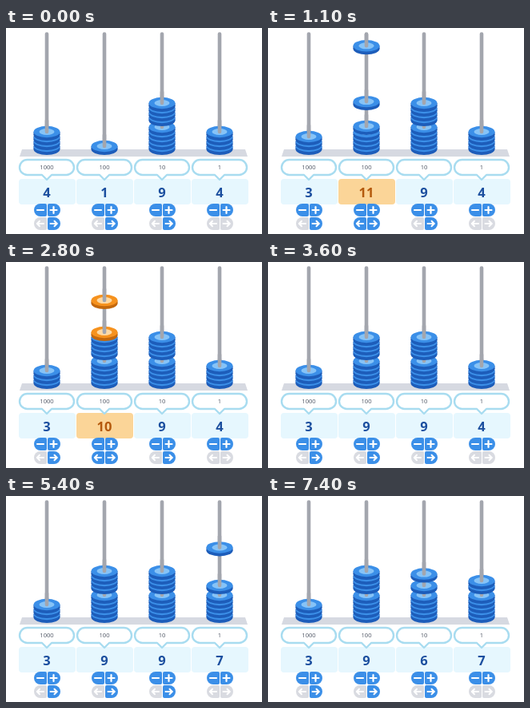
Recreate the animation shown at these times as an HTML page with a canvas. Size 320 by 258 pixels, loop 7.5 s.

```html
<!DOCTYPE html>
<html lang="en">
<head>
<meta charset="utf-8">
<title>Place value abacus</title>
<style>
  html, body { margin: 0; width: 100%; height: 100%; overflow: hidden; background: #fff; }
  canvas { display: block; width: 100vw; height: 100vh; }
</style>
</head>
<body>
<canvas id="stage"></canvas>
<script>
const W = 320, H = 258, LOOP = 7500;
const DROP = 300, LIFT = 200, LEAD = 18, OFF_Y = -21;
const BLUE = { top: '#3b8fe8', side: '#1d5dba', hole: '#86c3f7' };
const ORANGE = { top: '#f6921e', side: '#c4680c', hole: '#fdd9a4' };
const ROD = '#a3a6ae', OFF = '#d9dbe1', FONT = '"Open Sans", "Noto Sans", sans-serif';

const canvas = document.getElementById('stage');
const ctx = canvas.getContext('2d');

// adds: [click time, delay before the disc drops]; lifts: click times
const exchange = 653;
const columns = [
  { x: 51, unit: 1000, start: 4, adds: [], lifts: [exchange - LEAD] },
  { x: 123, unit: 100, start: 1,
    adds: Array.from({ length: 10 }, (_, i) => [exchange, Math.max(0, i - 1) * 100]),
    lifts: [2758, 3158] },
  { x: 195, unit: 10, start: 9, adds: [], lifts: [6840, 7140, 7385] },
  { x: 267, unit: 1, start: 4, adds: [[4498, 0], [4898, 0], [5301, 0]], lifts: [] }
];

// cubic-bezier(.25, .1, .25, 1)
function ease(x) {
  if (x <= 0) return 0;
  if (x >= 1) return 1;
  const curve = (s, a, b) => 3 * a * s * (1 - s) ** 2 + 3 * b * s * s * (1 - s) + s ** 3;
  let lo = 0, hi = 1;
  for (let i = 0; i < 20; i++) {
    const mid = (lo + hi) / 2;
    if (curve(mid, .25, .25) < x) lo = mid; else hi = mid;
  }
  return curve(lo, .1, 1);
}

const restY = k => 154 - 6 * k - (k > 5 ? 6 : 0);

function discY(col, k, t) {
  const rest = restY(k), total = col.start + col.adds.length;
  const add = col.adds[k - col.start - 1], lift = col.lifts[total - k];
  let y = rest;
  if (add) y = OFF_Y + (rest - OFF_Y) * ease((t - add[0] - add[1] + LEAD) / DROP);
  if (lift !== undefined) y += (OFF_Y - rest) * ease((t - lift) / LIFT);
  return y;
}

function ellipse(x, y, rx, ry, fill) {
  ctx.fillStyle = fill;
  ctx.beginPath();
  ctx.ellipse(x, y, rx, ry, 0, 0, 2 * Math.PI);
  ctx.fill();
}

function box(x, y, w, h, radii, fill) {
  ctx.fillStyle = fill;
  ctx.beginPath();
  ctx.roundRect(x, y, w, h, radii);
  ctx.fill();
}

function line(points, color, width) {
  ctx.strokeStyle = color;
  ctx.lineWidth = width;
  ctx.lineCap = ctx.lineJoin = 'round';
  ctx.beginPath();
  points.forEach(([x, y]) => ctx.lineTo(x, y));
  ctx.stroke();
}

function text(value, x, y, font, color) {
  ctx.font = `${font} ${FONT}`;
  ctx.fillStyle = color;
  ctx.textAlign = 'center';
  ctx.fillText(value, x, y);
}

function disc(x, y, c) {
  ellipse(x, y + 3.8, 16.5, 7.2, c.side);
  ctx.fillRect(x - 16.5, y, 33, 3.8);
  ellipse(x, y, 16.5, 7.2, c.top);
  ellipse(x, y, 9.5, 4, c.hole);
  if (y > 8) line([[x, Math.max(7.5, y - 14)], [x, y]], ROD, 4.6);
}

function base() {
  ctx.fillStyle = '#d6d9e1';
  ctx.beginPath();
  [[20, 152], [299, 152], [302, 161], [17, 161]].forEach(p => ctx.lineTo(...p));
  ctx.fill();
}

function bubble(x, unit) {
  const l = x - 34, r = x + 34, top = 165, bottom = 184, rad = 9.5;
  ctx.beginPath();
  ctx.moveTo(x - 6, bottom);
  ctx.arcTo(l, bottom, l, top, rad);
  ctx.arcTo(l, top, r, top, rad);
  ctx.arcTo(r, top, r, bottom, rad);
  ctx.arcTo(r, bottom, x, bottom, rad);
  ctx.lineTo(x + 6, bottom);
  ctx.lineTo(x, 190);
  ctx.closePath();
  ctx.fillStyle = '#fff';
  ctx.fill();
  ctx.strokeStyle = '#a8dcf0';
  ctx.lineWidth = 2.4;
  ctx.stroke();
  text(unit, x, 177.3, '7.6px', '#4d5563');
}

function buttonPair(x, y, leftOn, rightOn) {
  box(x - 16, y - 8, 16, 16, [8, 2, 2, 8], leftOn ? BLUE.top : OFF);
  box(x + 1, y - 8, 16, 16, [2, 8, 8, 2], rightOn ? BLUE.top : OFF);
}

function arrow(x, y, dir) {
  line([[x - 4 * dir, y], [x + 4 * dir, y]], '#fff', 2);
  line([[x + dir, y - 3.3], [x + 4.2 * dir, y], [x + dir, y + 3.3]], '#fff', 2);
}

function controls(x, unit, count) {
  const over = count > 9;
  box(x - 35, 189, 71, 32, 4, over ? '#fbd598' : '#e6f7fe');
  text(count, x, 211.5, 'bold 16.5px', over ? '#b4590c' : '#1c4f9f');
  bubble(x, unit);

  buttonPair(x, 228, true, true);
  line([[x - 12, 228], [x - 4, 228]], '#fff', 2.2);
  line([[x + 4.5, 228], [x + 12.5, 228]], '#fff', 2.2);
  line([[x + 8.5, 224], [x + 8.5, 232]], '#fff', 2.2);

  buttonPair(x, 245, over, unit > 1);
  arrow(x - 8, 245, -1);
  arrow(x + 8.5, 245, 1);
}

function draw(t) {
  const sx = innerWidth * devicePixelRatio, sy = innerHeight * devicePixelRatio;
  if (canvas.width !== Math.round(sx) || canvas.height !== Math.round(sy)) {
    canvas.width = Math.round(sx);
    canvas.height = Math.round(sy);
  }
  ctx.setTransform(canvas.width / W, 0, 0, canvas.height / H, 0, 0);
  ctx.fillStyle = '#fff';
  ctx.fillRect(0, 0, W, H);
  base();
  for (const col of columns) {
    line([[col.x, 7.5], [col.x, 152]], ROD, 4.6);
    for (let k = 1; k <= col.start + col.adds.length; k++) {
      const y = discY(col, k, t);
      if (y > OFF_Y) disc(col.x, y, k > 9 ? ORANGE : BLUE);
    }
    const added = col.adds.filter(([click]) => t >= click).length;
    const lifted = col.lifts.filter(click => t >= click).length;
    controls(col.x, col.unit, col.start + added - lifted);
  }
}

const began = performance.now();
function tick() {
  draw((performance.now() - began) % LOOP);
  requestAnimationFrame(tick);
}
tick();
</script>
</body>
</html>
```
